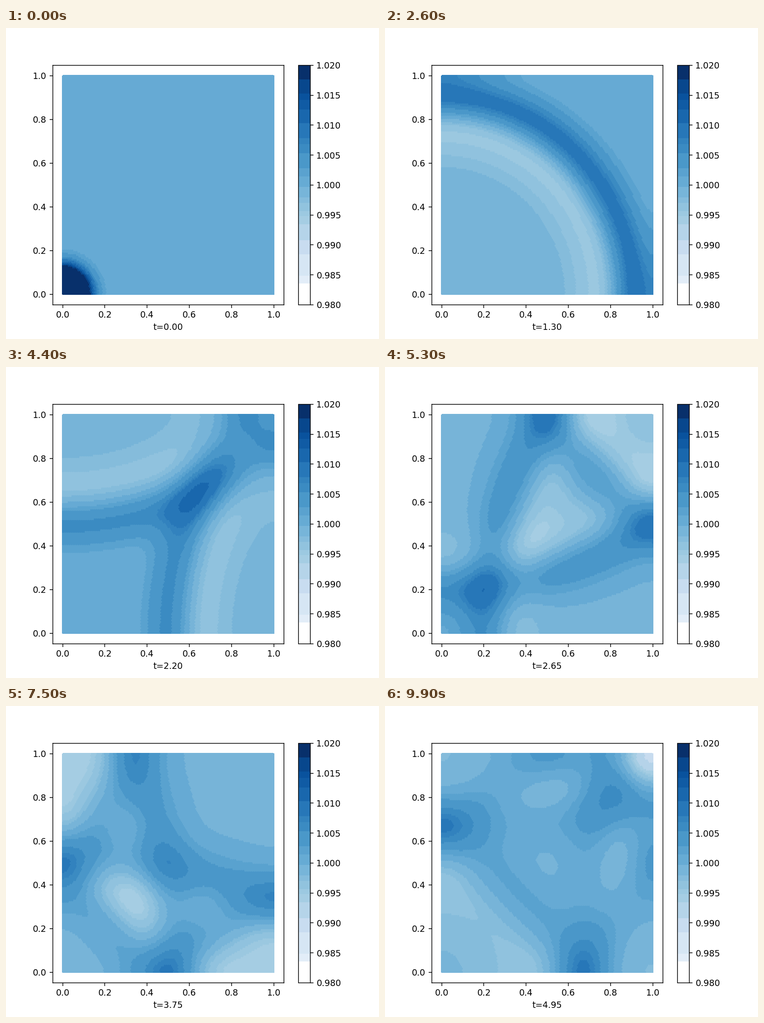
Recreate the animation shown at these times as a matplotlib script. Size 820x683 px, loop 10000 ms.

```python
import numpy as np
import matplotlib.pyplot as plt
from matplotlib.animation import FuncAnimation
from matplotlib.cm import ScalarMappable
from matplotlib.colors import ListedColormap, Normalize

W, H, DPI = 820, 683, 136.6
FRAMES, INTERVAL, DT = 100, 100, 0.05

# Wave in a unit box with reflecting walls, started by a Gaussian bump
SPEED, DAMP = 0.666, 0.0011
AMP, SHARP, MODES = 0.1, 100, 30

VMIN, VMAX = 0.98, 1.02
EDGE = 0.002            # distance of the outermost dots from the walls
COLS, ROWS = 116, 140   # staggered rows of dots
DOT = 2.4               # dot radius in pixels


def banded_blues():
    """Blues reduced to flat bands, listed by their edges from the top."""
    edges = np.array([0, 30, 62, 76, 97, 128, 161, 173, 193, 227, 244, 267,
                      290, 303, 320, 330, 349, 384, 415, 463, 478, 526]) / 526
    mids = 1 - (edges[:-1] + edges[1:]) / 2
    mids[0] = 1
    colors = plt.get_cmap("Blues")(mids)
    colors[-1] = 1
    levels = 1 - (np.arange(256) + 0.5) / 256
    return ListedColormap(colors[np.searchsorted(edges, levels) - 1])


fig, ax = plt.subplots(figsize=((W + 0.01) / DPI, (H + 0.01) / DPI), dpi=DPI)
cmap, norm = banded_blues(), Normalize(VMIN, VMAX)
fig.colorbar(ScalarMappable(norm, cmap), ax=ax)

span = 1 - 2 * EDGE
limits = EDGE - 0.05 * span, 1 - EDGE + 0.05 * span
ax.set(xlim=limits, ylim=limits)

# Dot positions, as fractions of the dot area
row, col = np.mgrid[0:ROWS + 1, 0:COLS + 2]
dot_x = np.clip((col - 0.5 * (row % 2)) / COLS, 0, 1).ravel()
dot_y = (row / ROWS).ravel()

# Pixel box that holds all dots
x0, y0 = ax.transData.transform((EDGE, EDGE))
x1, y1 = ax.transData.transform((1 - EDGE, 1 - EDGE))
left, bottom = int(x0 - DOT), int(y0 - DOT)
right, top = int(x1 + DOT) + 1, int(y1 + DOT) + 1
px, py = np.meshgrid(np.arange(left, right) + 0.5, np.arange(bottom, top) + 0.5)


def nearest_dots():
    """Index of the closest dot for every pixel."""
    fx = np.clip((px - x0) / (x1 - x0), 0, 1)
    fy = np.clip((py - y0) / (y1 - y0), 0, 1)
    low = np.minimum((fy * ROWS).astype(int), ROWS - 1)
    picks, dists = [], []
    for r in (low, low + 1):
        c = np.rint(fx * COLS + 0.5 * (r % 2)).astype(int)
        i = r * (COLS + 2) + c
        picks.append(i)
        dists.append(np.hypot((dot_x[i] - fx) * (x1 - x0),
                              (dot_y[i] - fy) * (y1 - y0)))
    return np.where(dists[0] < dists[1], *picks)


owner = nearest_dots()
outside = np.hypot(px - np.clip(px, x0, x1), py - np.clip(py, y0, y1)) > DOT

# Cosine modes
k = np.pi * np.arange(MODES)
coef = np.sqrt(np.pi / SHARP) * np.exp(-k**2 / (4 * SHARP))
coef[0] /= 2
coef = AMP * np.outer(coef, coef)
k2 = k[:, None]**2 + k**2
cos_x = np.cos(np.outer(EDGE + span * dot_x, k))
cos_y = np.cos(np.outer(EDGE + span * dot_y, k))


def height(t):
    c = coef * np.cos(SPEED * np.sqrt(k2) * t) * np.exp(-DAMP * k2 * t / 2)
    return 1 + np.sum((cos_y @ c) * cos_x, axis=1)


def picture(t):
    rgba = cmap(norm(height(t)), bytes=True)[owner]
    rgba[outside] = 255, 255, 255, 0
    return rgba


to_data = ax.transData.inverted().transform
(ex0, ey0), (ex1, ey1) = to_data([(left, bottom), (right, top)])
image = ax.imshow(picture(0), extent=(ex0, ex1, ey0, ey1), origin="lower",
                  aspect="auto", interpolation="nearest")
ax.set(xlim=limits, ylim=limits)
label = ax.set_xlabel("t=0.00")


def update(i):
    t = i * DT
    image.set_data(picture(t))
    label.set_text(f"t={t:.2f}")
    return image, label


anim = FuncAnimation(fig, update, frames=FRAMES, interval=INTERVAL,
                     repeat=True, repeat_delay=0, blit=False)
plt.show()
```
